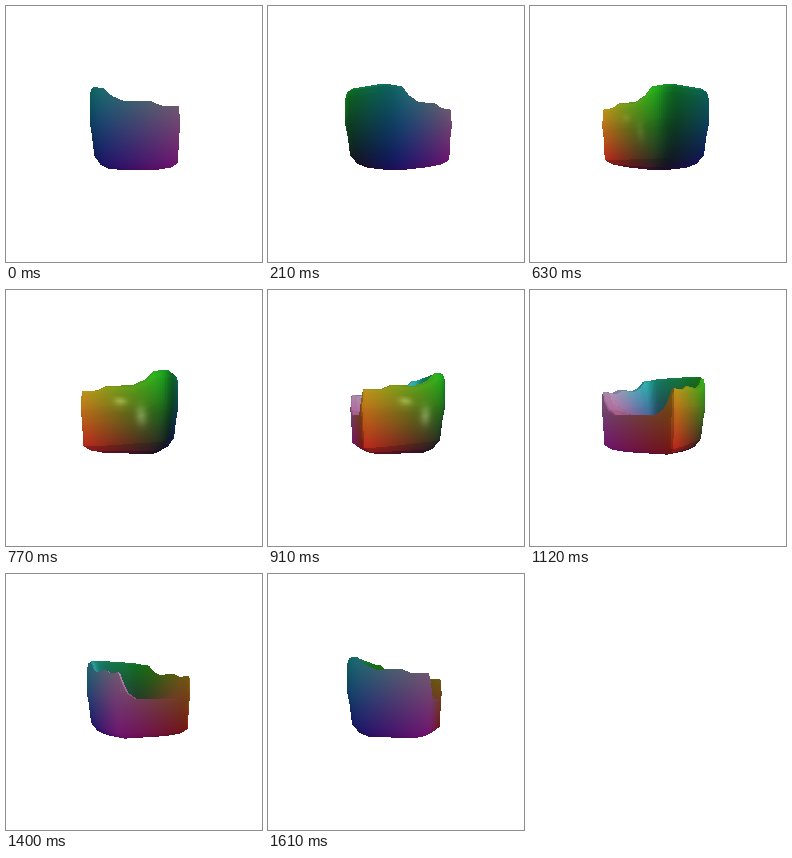
An HTML page with a canvas for the animation above (1680 ms loop, 256 px wide and 256 px high).

```html
<!DOCTYPE html>
<html lang="en">
<head>
<meta charset="utf-8">
<title>Turning armchair</title>
<style>
  html, body { margin: 0; width: 100%; height: 100%; overflow: hidden; background: #fff; }
  canvas { display: block; width: 100vw; height: 100vh; image-rendering: pixelated; }
</style>
</head>
<body>
<canvas id="stage" width="256" height="256"></canvas>
<script>
const SIZE = 256, MID = 128, CAM = 328;
const LOOP = 1680, STEPS = 24, SEGS = 180, WALL = 10, SEAT = 3;
const ctx = document.getElementById('stage').getContext('2d');
const image = ctx.createImageData(SIZE, SIZE);
const pixels = new Uint32Array(image.data.buffer);
const zbuf = new Float32Array(SIZE * SIZE);

const lerp = (a, b, t) => a + (b - a) * t;
const clamp = v => Math.max(0, Math.min(1, v));
const cross = (a, b) => [a[1] * b[2] - a[2] * b[1], a[2] * b[0] - a[0] * b[2], a[0] * b[1] - a[1] * b[0]];
const sub = (a, b) => a.map((v, i) => v - b[i]);
const dot = (a, b) => a[0] * b[0] + a[1] * b[1] + a[2] * b[2];
const unit = v => { const l = Math.hypot(...v) || 1; return v.map(c => c / l); };

// Rim height by angle in degrees from the front: seat edge, arms, back.
const RIM = [[0, 3], [28, 3], [36, 8], [40, 15], [44, 25], [57, 25], [68, 29],
             [103, 29], [119, 34], [128, 41], [150, 44], [180, 44]];
function rimHeight(a) {
  const deg = Math.abs(a) * 180 / Math.PI;
  const i = Math.max(1, RIM.findIndex(p => p[0] >= deg - 1e-6));
  const [x0, y0] = RIM[i - 1], [x1, y1] = RIM[i];
  return lerp(y0, y1, (deg - x0) / (x1 - x0));
}

// Plan outline: square corners in front, rounder ones behind.
function radius(a) {
  const c = Math.cos(a), front = c > 0;
  const n = front ? 30 : 5.4;
  return Math.pow(Math.abs(c / (front ? 40.5 : 41.5)) ** n + Math.abs(Math.sin(a) / 39.2) ** n, -1 / n);
}

// One profile from the underside, up the wall, over the rim, into the seat.
function profile(a) {
  const k = (1 - Math.cos(a)) / 2, r = radius(a), h = rimHeight(a);
  const base = lerp(-27, -20, k), foot = lerp(.98, .9, k), top = h - lerp(1, 8, k);
  const rings = [[0, -33], [.6, -33], [lerp(.85, .76, k), lerp(-30.5, -29, k)]];
  for (let i = 0; i <= WALL; i++) {
    const t = i / WALL, y = lerp(base, top, t);
    const bulge = .025 * Math.exp(-(((y - 9) / 6) ** 2)) * Math.abs(Math.sin(a));
    rings.push([lerp(foot, 1, Math.min(1, t * 1.6)) + bulge, y]);
  }
  rings.push([lerp(1, .97, k), lerp(top, h, .7)], [lerp(.99, .9, k), h]);
  for (const [s, t] of [[.87, .95], [.78, .65], [.68, .28], [.55, 0], [0, 0]])
    rings.push([s, lerp(SEAT, h, t)]);
  return rings.map(([s, y]) => [Math.cos(a) * r * s, y, Math.sin(a) * r * s]);
}

const LIGHT = unit([0, .25, -.96]);
// Highlights on the lit side: front, up, width, height.
const GLOWS = [[2, 14, 6, 3], [-17, 2, 5, 8]];

// Axes are front, up and side; each drives one colour channel.
function tint(p, n) {
  const lit = .45 + .33 * Math.max(0, dot(n, LIGHT)) - .05 * Math.max(0, -n[0]);
  const base = [(p[0] + 40) / 80, (p[1] + 33) / 77, (p[2] + 39) / 78];
  return base.map(v => 255 * lit * (.13 + .85 * clamp(v)));
}
function gloss(p, n) {
  if (n[2] > -.5 || p[2] > -25) return 0;
  return GLOWS.reduce((sum, [f, y, w, h]) =>
    sum + 60 * Math.exp(-(((p[0] - f) / w) ** 2) - ((p[1] - y) / h) ** 2), 0);
}

const cols = [];
for (let i = 0; i < SEGS; i++) cols.push(profile(-Math.PI + i * 2 * Math.PI / SEGS));

const faces = [];
function addFace(a, b, c) {
  const n = cross(sub(b, a), sub(c, a));
  if (Math.hypot(...n) < 1e-6) return;
  const u = unit(n);
  faces.push([a, b, c].map(p => ({ p, rgb: tint(p, u), shine: gloss(p, u) })));
}
cols.forEach((col, i) => {
  const next = cols[(i + 1) % SEGS];
  for (let j = 0; j + 1 < col.length; j++) {
    addFace(col[j], col[j + 1], next[j + 1]);
    addFace(col[j], next[j + 1], next[j]);
  }
});

function fill(v) {
  const [a, b, c] = v;
  const area = (b.x - a.x) * (c.y - a.y) - (c.x - a.x) * (b.y - a.y);
  if (Math.abs(area) < 1e-6) return;
  const xs = v.map(q => q.x), ys = v.map(q => q.y);
  const x0 = Math.floor(Math.min(...xs)), x1 = Math.ceil(Math.max(...xs));
  const y0 = Math.floor(Math.min(...ys)), y1 = Math.ceil(Math.max(...ys));
  for (let y = y0; y < y1; y++) for (let x = x0; x < x1; x++) {
    const px = x + .5, py = y + .5;
    const wb = ((px - a.x) * (c.y - a.y) - (c.x - a.x) * (py - a.y)) / area;
    const wc = ((b.x - a.x) * (py - a.y) - (px - a.x) * (b.y - a.y)) / area;
    const wa = 1 - wb - wc;
    if (wa < -1e-6 || wb < -1e-6 || wc < -1e-6) continue;
    const z = wa * a.z + wb * b.z + wc * c.z, at = y * SIZE + x;
    if (z <= zbuf[at]) continue;
    zbuf[at] = z;
    const shine = wa * a.shine + wb * b.shine + wc * c.shine;
    const ch = i => Math.min(255, wa * a.rgb[i] + wb * b.rgb[i] + wc * c.rgb[i] + shine) | 0;
    pixels[at] = (255 << 24 | ch(2) << 16 | ch(1) << 8 | ch(0)) >>> 0;
  }
}

function draw(step) {
  const turn = step / STEPS * 2 * Math.PI, co = Math.cos(turn), si = Math.sin(turn);
  const glare = Math.max(0, -co) ** 4;
  pixels.fill(0xffffffff);
  zbuf.fill(-1e9);
  for (const face of faces) fill(face.map(({ p, rgb, shine }) => {
    const z = p[2] * co - p[0] * si, s = CAM / (CAM - z);
    return { x: MID + (p[0] * co + p[2] * si) * s, y: MID - p[1] * s, z, rgb, shine: shine * glare };
  }));
  ctx.putImageData(image, 0, 0);
}

let shown = -1;
const start = performance.now();
function tick() {
  const t = Math.max(0, performance.now() - start) % LOOP;
  const step = Math.floor(t / LOOP * STEPS);
  if (step !== shown) draw(shown = step);
  requestAnimationFrame(tick);
}
tick();
</script>
</body>
</html>
```
